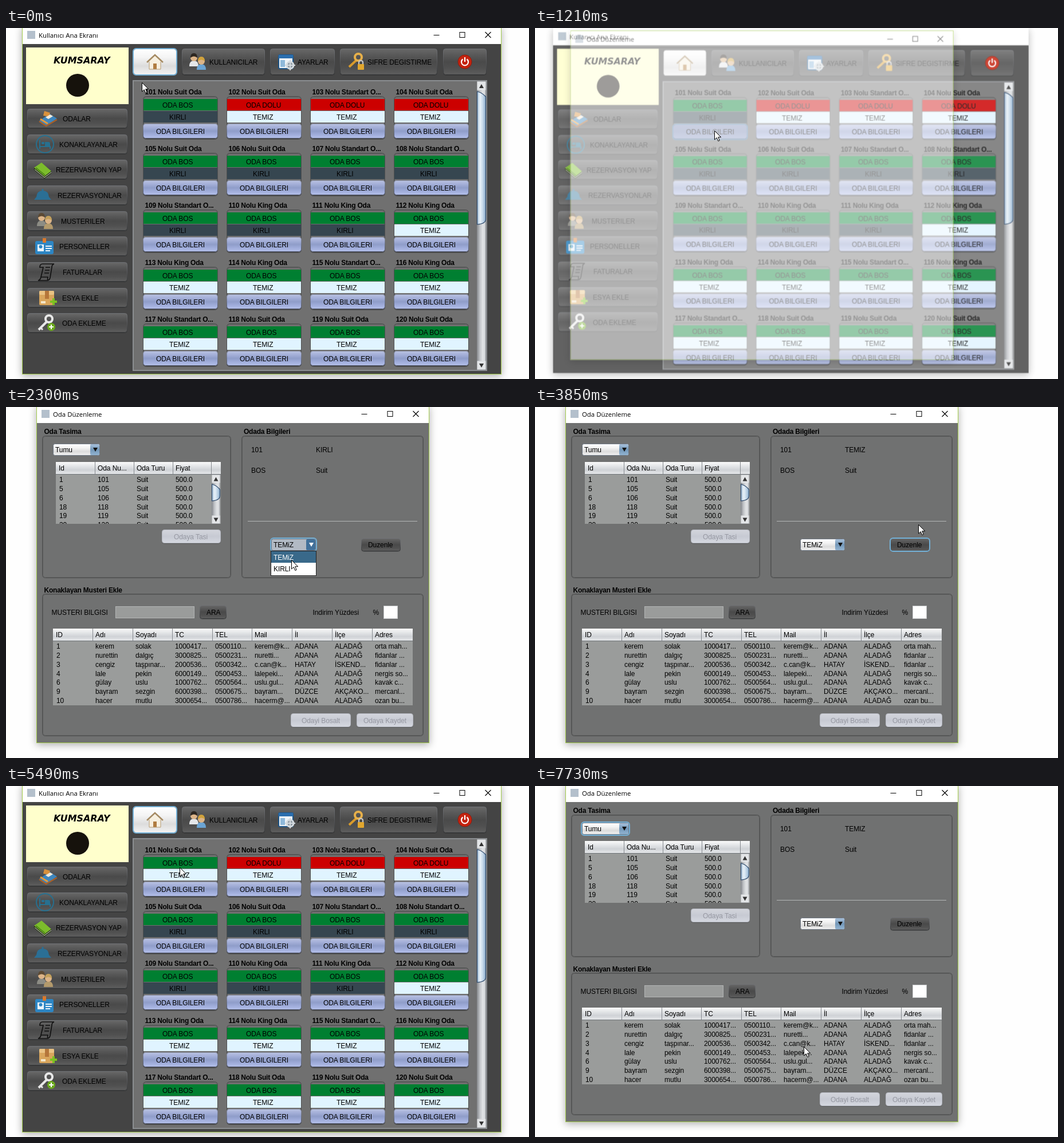
Recreate the animation shown at these times as an HTML page. Size 913 by 613 pixels, loop 8000 ms.

```html
<!DOCTYPE html>
<html lang="tr">
<head>
<meta charset="utf-8">
<title>Otel</title>
<style>
html, body { margin: 0; width: 100%; height: 100%; overflow: hidden; background: #fefefe; }
svg { display: block; width: 100%; height: 100%; }
text { font: 12px "Liberation Sans", Arial, sans-serif; fill: #000; letter-spacing: -.08px; white-space: pre; }
.b { font-weight: bold; letter-spacing: -.22px; }
.t { font: 11.4px "Open Sans", "Noto Sans", sans-serif; letter-spacing: 0; }
.w { fill: #fff; }
.d { fill: #9698a2; }
.brand { font: italic bold 16px "DejaVu Sans", sans-serif; }
.shadow { filter: drop-shadow(0 3px 7px rgba(0, 0, 0, .32)); }

/* one loop is 8 s, so 1% is 80 ms */
#main, #edit { animation: main 8s linear infinite; transform-origin: 447px 301px; }
#edit { animation-name: edit; transform-origin: 396px 292px; }
#cursor { animation: cursor 8s ease-in-out infinite; }
.s { animation: 8s step-end infinite; }

@keyframes main {
  0%, 13.1% { opacity: 1; transform: scale(1); }
  15.125% { opacity: .84; transform: scale(.992); }
  17.5%, 59.7% { opacity: 0; transform: scale(.95); }
  60.75% { opacity: .34; transform: scale(.967); }
  63.5%, 85.7% { opacity: 1; transform: scale(1); }
  87.125% { opacity: .8; transform: scale(.99); }
  89.3%, 100% { opacity: 0; transform: scale(.95); }
}
@keyframes edit {
  0%, 14.2% { opacity: 0; transform: scale(.95); }
  15.125% { opacity: .5; transform: scale(.975); }
  17.5%, 58.7% { opacity: 1; transform: scale(1); }
  60.75% { opacity: .21; transform: scale(.962); }
  61.5%, 86.2% { opacity: 0; transform: scale(.95); }
  87.125% { opacity: .41; transform: scale(.969); }
  89.5%, 100% { opacity: 1; transform: scale(1); }
}
@keyframes cursor {
  0%, 1.75% { transform: translate(237px, 95px); }
  6.6%, 17.5% { transform: translate(313px, 179px); }
  23.1%, 26.1% { transform: translate(531px, 236px); }
  28.75%, 31.6% { transform: translate(498px, 267px); }
  39.4%, 45.3% { transform: translate(661px, 246px); }
  55%, 61.5% { transform: translate(706px, 16px); }
  68.6%, 69.5% { transform: translate(303px, 142px); }
  71% { transform: translate(306px, 127px); }
  75.25%, 91.8% { transform: translate(336px, 179px); }
  96.6%, 100% { transform: translate(469px, 455px); }
}
@keyframes homeFocus { 0% { opacity: 1 } 11.5% { opacity: 0 } 55% { opacity: 1 } 84.125% { opacity: 0 } }
@keyframes roomHover { 0% { opacity: 0 } 5.7% { opacity: 1 } 11.5% { opacity: 0 } 73.9% { opacity: 1 } 84.125% { opacity: 0 } }
@keyframes roomFocus { 0% { opacity: 0 } 11.5% { opacity: 1 } 55% { opacity: 0 } 84.125% { opacity: 1 } }
@keyframes roomClean { 0% { opacity: 0 } 55% { opacity: 1 } }
@keyframes mainBlank { 0% { opacity: 0 } 55% { opacity: 1 } 62.25% { opacity: 0 } }
@keyframes mainActive { 0% { opacity: 1 } 13.1% { opacity: 0 } 55% { opacity: 1 } 86% { opacity: 0 } }
@keyframes editBlank { 0% { opacity: 1 } 17.25% { opacity: 0 } 65% { opacity: 1 } 89% { opacity: 0 } }
@keyframes filterFocus { 0% { opacity: 1 } 26.1% { opacity: 0 } 65% { opacity: 1 } }
@keyframes stateFocus { 0% { opacity: 0 } 26.1% { opacity: 1 } 43.375% { opacity: 0 } }
@keyframes popup { 0% { opacity: 0 } 26.1% { opacity: 1 } 31.625% { opacity: 0 } }
@keyframes saveHover { 0% { opacity: 0 } 37.5% { opacity: 1 } 43.375% { opacity: 0 } }
@keyframes saveFocus { 0% { opacity: 0 } 43.375% { opacity: 1 } 65% { opacity: 0 } }
@keyframes dirtyLabel { 0% { opacity: 1 } 45.375% { opacity: 0 } }
@keyframes cleanLabel { 0% { opacity: 0 } 45.375% { opacity: 1 } }
@keyframes closeHover { 0% { opacity: 0 } 52.9% { opacity: 1 } 65% { opacity: 0 } }
</style>
</head>
<body>
<svg viewBox="0 0 913 613" xmlns="http://www.w3.org/2000/svg">
  <defs id="defs"></defs>
  <g id="main"></g>
  <g id="edit"></g>
  <path id="cursor" d="M.5 .5V16L4.2 12.6 6.8 18.5 9.2 17.4 6.7 11.7H11.7Z" fill="#fff" stroke="#000"/>
</svg>
<script>
const $ = id => document.getElementById(id);
const rect = (x, y, w, h, fill, rx = 0, stroke = 'none', sw = 1) =>
  `<rect x="${x}" y="${y}" width="${w}" height="${h}" rx="${rx}" fill="${fill}" stroke="${stroke}" stroke-width="${sw}"/>`;
const text = (x, y, s, cls = '') => `<text x="${x}" y="${y}" class="${cls}">${s}</text>`;
const line = (d, stroke, sw = 1, fill = 'none') => `<path d="${d}" fill="${fill}" stroke="${stroke}" stroke-width="${sw}"/>`;
const shape = (d, fill) => `<path d="${d}" fill="${fill}"/>`;
const disc = (x, y, r, fill, stroke = 'none', sw = 1) =>
  `<circle cx="${x}" cy="${y}" r="${r}" fill="${fill}" stroke="${stroke}" stroke-width="${sw}"/>`;
const state = (name, s) => `<g class="s" style="animation-name:${name}">${s}</g>`;
const at = (x, y, s) => `<g transform="translate(${x} ${y})">${s}</g>`;
const map = (list, fn) => list.map(fn).join('');

const gradient = (id, stops, flat) => `<linearGradient id="${id}" x2="${flat ? 1 : 0}" y2="${flat ? 0 : 1}">` +
  map(stops, (c, i) => `<stop offset="${i / (stops.length - 1)}" stop-color="${c}"/>`) + '</linearGradient>';
$('defs').innerHTML =
  gradient('dark', ['#686868', '#585858', '#4a4a4a', '#505050', '#5e5e5e']) +
  gradient('rim', ['#707276', '#58595c', '#343638']) +
  gradient('light', ['#fff', '#f4f4f4', '#dcdcdc', '#f2f2f2']) +
  gradient('lilac', ['#b9c2e2', '#a4afd8', '#8f9dc9', '#a0addb', '#b4c0ea']) +
  gradient('lilacRim', ['#8b91a4', '#6c7388', '#4d5367']) +
  gradient('hover', ['#d3d9ee', '#c2cbe8', '#adb9de', '#c4cef0']) +
  gradient('press', ['#8391bb', '#7b89b4', '#8f9dc9']) +
  gradient('off', ['#d3d5dc', '#c7cad3', '#d5d8e0']) +
  gradient('head', ['#fafafa', '#e4e6e8', '#cfd2d6', '#e6e8ea']) +
  gradient('arrow', ['#a9c2dc', '#7397b8', '#92b4d2']) +
  gradient('track', ['#8b8e92', '#c3c6ca', '#e2e4e6', '#c9ccd0'], true) +
  gradient('thumb', ['#9db9d3', '#e9f2f9', '#c3d7e9', '#87a9c8'], true) +
  '<clipPath id="clip"><rect x="87" y="118" width="288" height="86"/></clipPath>';

const button = (x, y, w, h, fill = 'url(#dark)', stroke = 'url(#rim)') =>
  rect(x + .5, y + 1.5, w - 1, h - 1, 'none', 4, 'rgba(30,30,30,.3)') + rect(x + .5, y + .5, w - 1, h - 1, fill, 4, stroke);
const frame = (x, y, w, h) =>
  rect(x + 1.5, y + 1.5, w - 3, h - 3, 'none', 4, '#5b5c5c') + rect(x + .5, y + .5, w - 1, h - 1, 'none', 5, '#505151');
const ring = (x, y, w, h, color = '#73b0d6') => rect(x, y, w, h, 'none', 5, color, 2);

function scrollbar(x, y, w, h, top, bottom) {
  const m = x + w / 2, e = y + h;
  return rect(x, y, w, h, 'url(#track)', 0, '#8a8d91') +
    rect(x, y, w, w, '#e3e5e7') + rect(x, e - w, w, w, '#e3e5e7') +
    shape(`M${m - 4} ${y + w / 2 + 4}h8l-4-7z`, '#333') + shape(`M${m - 4} ${e - w / 2 - 3}h8l-4 7z`, '#333') +
    line(`M${x} ${top}q${w / 2} 1 ${w} 9V${bottom - 9}q0 8 ${-w} 9z`, '#2f4a6b', 1.2, 'url(#thumb)');
}

function controls(x) {
  const c = x + 90;
  return line(`M${x - 5} 12.5h10`, '#000') + rect(x + 40.5, 7.5, 9, 9, 'none', 0, '#000') +
    line(`M${c - 5} 7l10 10m0-10l-10 10`, '#000', 1.1);
}

function shell(x, w, h, title, body) {
  return `<g class="shadow">${rect(x, -3, w, h + 3, '#fff')}</g>` +
    rect(x, 28, w, h - 28, body) + rect(x + 9, 5, 14, 14, '#b4c0cc') + text(x + 29, 17, title, 't');
}
const edge = (x, w, h) => rect(x + .5, -2.5, w - 1, h + 2, 'none', 0, '#a3cc4c');

/* icons, drawn around their own centre */
const plus = disc(9, 7, 7, '#6aa81c') + line('M5 7h8M9 3v8', '#fff', 2);
const person = (x, y, hair, body) =>
  shape(`M${x - 8} ${y + 15}q0-10 8-10t8 10z`, body) + disc(x, y, 6, '#dcb488') + shape(`M${x - 6} ${y}q0-8 6-8t6 8q-6-5-12 0z`, hair);
const icon = {
  bed: shape('M-15 4L3-8 16 0-3 13z', '#3e86bd') + shape('M-6-13L4-10 2-3-8-5z', '#d9913c') +
    shape('M-4-2L4-7 9-4 1 1z', '#f2e9d8') + line('M-15 5L-3 13 16 2', '#a75f28', 2.5) + line('M-13 1L0 9', '#e69a3c', 3),
  sleep: disc(0, 0, 15, 'none', '#27708f', 2) + line('M-9-7V8M-9 4H9V8', '#27708f', 2) +
    rect(-6, -4, 5, 4, '#27708f') + shape('M0-4h6q3 0 3 3v4H0z', '#27708f'),
  book: shape('M-15-3L-2-12 15 3 3 12z', '#7cbc2c') + shape('M-15-3v4L3 16 15 7V3L3 12z', '#22300f') +
    line('M-14 0L3 14 15 5', '#e4e8dc', 1) + line('M-12-3L4 10', '#4f8a18', 2),
  cloche: shape('M-11 3q1-11 11-11t11 11l4 5h-30z', '#2b6f95') + rect(-1.5, -11, 3, 4, '#2b6f95', 1),
  users: person(-6, -6, '#5c4a34', '#8c8c84') + person(6, -1, '#c3a05c', '#b39a6c'),
  admins: person(-7, -7, '#2c2620', '#e4e7ea') + person(6, -1, '#d0a23c', '#6ba4d4'),
  card: rect(-16, -9, 32, 23, '#2d86c4', 3) + rect(-3, -14, 6, 8, '#d8792d') + rect(-12, -3, 11, 12, '#e9f3fa') +
    disc(-6.5, 1, 3, '#2d86c4') + line('M2 0h11M2 4h11M2 8h8', '#e9f3fa', 2),
  scroll: line('M-6-14H14q-4 1-4 6L7 10q-1 5-6 5h-15q4-1 5-6H3q-1 5 0 6M-9 9L-5-8H-11q0-6 5-6M-1-8H7M-2-3H6M-3 2H5', '#111', 1.7),
  box: rect(-14, -12, 26, 25, '#d8a55c', 2) + rect(-14, -12, 26, 7, '#e9c283', 2) + rect(-4, -12, 7, 14, '#b5763a') +
    rect(-11, 6, 8, 4, '#f4e6c8') + line('M5 7h12M11 1v12', '#7cc022', 4),
  key: line('M2-3L-13 12', '#e8e8e8', 4) + line('M-10 8l4 4', '#e8e8e8', 3) + disc(5, -7, 6, 'none', '#e8e8e8', 4) + plus,
  lock: line('M2-4L-12 9', '#d99b2b', 4) + disc(4, -8, 6, 'none', '#e7b04a', 4) +
    rect(3, 4, 11, 10, '#e2a72e', 1) + line('M5 4V1q0-3 3.5-3t3.5 3v3', '#c9c9c9', 2),
  panel: rect(-14, -12, 25, 24, '#eef3f7', 2, '#1f5688', 2) + rect(-14, -12, 25, 6, '#2b6eae') + rect(-11, -3, 8, 12, '#8fb9da') +
    disc(6, 6, 6, '#8c98a2', '#d4dade', 3) + line('M6-3v18M-3 6h18', '#d4dade', 2),
  home: shape('M-10-1V13H10V-1L0-10z', '#f6efdf') + line('M-14 1L0-12 14 1', '#a58a62', 2.5) +
    rect(-3, 3, 6, 10, '#b07c40') + line('M-10 0V13H10V0', '#b59b74'),
  power: disc(0, 0, 12, '#c4230f', '#8e1a0c') + line('M-3.5-4.5a6 6 0 1 0 7 0M0-8V0', '#fff', 2.2)
};

/* room overview */
const menu = [
  ['ODALAR', 99, 'bed', 73], ['KONAKLAYANLAR', 93, 'sleep', 68], ['REZERVASYON YAP', 87, 'book', 64],
  ['REZERVASYONLAR', 90, 'cloche', 64], ['MUSTERILER', 96, 'users', 68], ['PERSONELLER', 93, 'card', 67],
  ['FATURALAR', 99, 'scroll', 70], ['ESYA EKLE', 98, 'box', 72], ['ODA EKLEME', 98, 'key', 70]
];
const tools = [
  [307, 145, 'KULLANICILAR', 355, 'admins', 335], [461, 113, 'AYARLAR', 509, 'panel', 490],
  [583, 170, 'SIFRE DEGISTIRME', 631, 'lock', 611], [763, 76, '', 0, 'power', 801]
];
const kinds = { S: 'Suit Oda', T: 'Standart O...', K: 'King Oda' };

const cleanBar = rect(1, 145, 129, 20, '#e0f4ff') + text(46, 160, 'TEMIZ');
const dirtyBar = rect(1, 145, 129, 20, '#364650') + text(46, 160, 'KIRLI');
const roomButton = (fill, stroke = 'url(#lilacRim)') => button(0, 167, 131, 26, `url(#${fill})`, stroke);

function room(kind, i) {
  const full = i > 0 && i < 4, dirty = i === 0 || i > 3 && i < 11;
  let s = text(3.5, 116, `${101 + i} Nolu ${kinds[kind]}`, 'b') + frame(0, 119, 131, 76) +
    rect(1, 124, 129, 20, full ? '#cc0000' : '#007f31') + text(34, 139, full ? 'ODA DOLU' : 'ODA BOS') +
    (dirty ? dirtyBar : cleanBar) + roomButton('lilac');
  if (!i) s += state('roomClean', cleanBar) + state('roomHover', roomButton('hover')) +
    state('roomFocus', roomButton('press', '#3f5478') + ring(0, 167, 131, 27, '#5c86b0'));
  return at(239 + i % 4 * 146, Math.round((i >> 2) * 99.2), s + text(23, 185, 'ODA BILGILERI'));
}

$('main').innerHTML = shell(28, 837, 605, 'Kullanıcı Ana Ekranı', '#444') +
  rect(35, 34, 179, 99, '#ffffcc') + text(83, 62, 'KUMSARAY', 'brand') + disc(125, 100, 20, '#16120c') +
  map(menu, ([s, x, name, ix], i) => {
    const y = Math.round(158 + i * 44.65);
    return button(37, y - 17, 175, 34) + at(ix, y, icon[name]) + text(x, y + 5, s);
  }) +
  button(222, 36, 76, 46, 'url(#light)', '#777') + state('homeFocus', ring(222, 36, 76, 46)) + at(260, 59, icon.home) +
  map(tools, ([x, w, s, tx, name, ix]) => button(x, 36, w, 46) + at(ix, 59, icon[name]) + text(tx, 64, s)) +
  rect(222, 92, 617, 506, '#707070', 0, '#8b8e91', 2) +
  map([...'SSTSSSTTTKKKKKTKTSSS'], room) +
  scrollbar(822.5, 93.5, 15, 503, 111, 343) +
  state('mainBlank', rect(28, 28, 837, 577, '#fff')) +
  state('mainActive', controls(751.5) + edge(28, 837, 605));

/* room editor */
function table(x, y, w, h, cols, head, rows, baseline) {
  return rect(x, y + 21, w, h - 21, '#9a9c9b') + rect(x, y, w, 21, 'url(#head)') +
    line(`M${x} ${y + 21.5}h${w}`, '#6f7479') +
    map(cols, (c, i) => (i ? line(`M${c + .5} ${y}v21`, '#85898e') : '') + text(c + 5, y + 15, head[i] || '') +
      map(rows, (r, n) => text(c + (i ? 5 : 6), baseline + Math.round(n * 15.85), r[i] || '')));
}
function combo(x, y, w, s, fill = 'url(#light)') {
  return rect(x + .5, y + .5, w - 1, 20, fill, 3, '#6d7683') + rect(x + w - 17, y + 1, 16, 19, 'url(#arrow)', 2) +
    shape(`M${x + w - 12} ${y + 7}h8l-4 7z`, '#111') + text(x + 4, y + 15, s);
}
const offButton = (x, y, w, h, tx, s) => button(x, y, w, h, 'url(#off)', '#b4b7c0') + text(tx, y + 17, s, 'd');

const stock = [1, 5, 6, 18, 19, 20].map(n => [n, 100 + n, 'Suit', '500.0']);
const stockCols = [87, 155, 223, 291, 358];
const guests = [
  '1|kerem|solak|1000417...|0500110...|kerem@k...|ADANA|ALADAĞ|orta mah...',
  '2|nurettin|dalgıç|3000825...|0500231...|nuretti...|ADANA|ALADAĞ|fidanlar ...',
  '3|cengiz|taşpınar...|2000536...|0500342...|c.can@k...|HATAY|İSKEND...|fidanlar ...',
  '4|lale|pekin|6000149...|0500453...|lalepeki...|ADANA|ALADAĞ|nergis so...',
  '6|gülay|uslu|1000762...|0500564...|uslu.gul...|ADANA|ALADAĞ|kavak c...',
  '9|bayram|sezgin|6000398...|0500675...|bayram...|DÜZCE|AKÇAKO...|mercanl...',
  '10|hacer|mutlu|3000654...|0500786...|hacerm@...|ADANA|ALADAĞ|ozan bu...'
].map(s => s.split('|'));

$('edit').innerHTML = shell(53, 686, 587, 'Oda Düzenleme', '#707171') + controls(625.5) +
  state('closeHover', rect(693, -2, 45, 30, '#e81123') + line('M710.5 7l10 10m0-10l-10 10', '#fff', 1.1)) +
  text(66.5, 47, 'Oda Tasima', 'b') + frame(63, 50, 330, 249) +
  text(415, 47, 'Odada Bilgileri', 'b') + frame(411, 50, 318, 249) +
  text(66.5, 324, 'Konaklayan Musteri Ekle', 'b') + frame(63, 326, 666, 249) +
  combo(82, 64, 82, 'Tumu') + state('filterFocus', ring(81, 63, 84, 23)) +
  `<g clip-path="url(#clip)">${table(87, 96, 288, 108, stockCols, [], stock, 131)}</g>` +
  table(87, 96, 288, 21, stockCols, ['Id', 'Oda Nu...', 'Oda Turu', 'Fiyat'], [], 0) +
  scrollbar(359.5, 118.5, 14, 85, 135, 164) +
  offButton(272, 214, 103, 24, 293, 'Odaya Tasi') +
  text(428, 79, '101') + text(428, 115, 'BOS') + text(541, 115, 'Suit') +
  state('dirtyLabel', text(541, 79, 'KIRLI')) + state('cleanLabel', text(541, 79, 'TEMIZ')) +
  line('M422 199.5H718', '#b4b6b6') +
  combo(463, 230, 78, 'TEMiZ') +
  button(620, 229, 69, 23) + state('saveHover', button(620, 229, 69, 23, '#7b7b7b')) +
  state('saveFocus', ring(620, 229, 69, 23)) + text(632, 245, 'Duzenle') +
  text(79.5, 363, 'MUSTERI BILGISI') + rect(191.5, 348.5, 137, 20, '#9a9c9b', 0, '#b3b5b5') +
  button(338, 346, 47, 24) + text(350, 363, 'ARA') +
  text(535.5, 363, 'Indirim Yüzdesi') + text(640.5, 363, '%') + rect(659.5, 347.5, 24, 22, '#fff', 0, '#c5c7c9') +
  table(82, 387, 628, 134, [82, 151, 221, 290, 360, 429, 499, 569, 639],
    ['ID', 'Adı', 'Soyadı', 'TC', 'TEL', 'Mail', 'İl', 'İlçe', 'Adres'], guests, 422) +
  offButton(497, 535, 105, 24, 516, 'Odayi Bosalt') + offButton(612, 535, 99, 24, 624, 'Odaya Kaydet') +
  state('stateFocus', ring(462, 229, 80, 23)) +
  state('popup', combo(463, 230, 78, 'TEMiZ', '#b2bac4') + rect(524, 231, 16, 19, '#41709a', 2) +
    shape('M529 237h8l-4 7z', '#fff') + rect(462.5, 251.5, 79, 43, '#fff', 0, '#222') +
    rect(463, 252, 78, 20, '#39698a') + text(467, 267, 'TEMiZ', 'w') + text(467, 287, 'KIRLI')) +
  state('editBlank', rect(53, 28, 686, 559, '#fff')) + edge(53, 686, 587);
</script>
</body>
</html>
```
